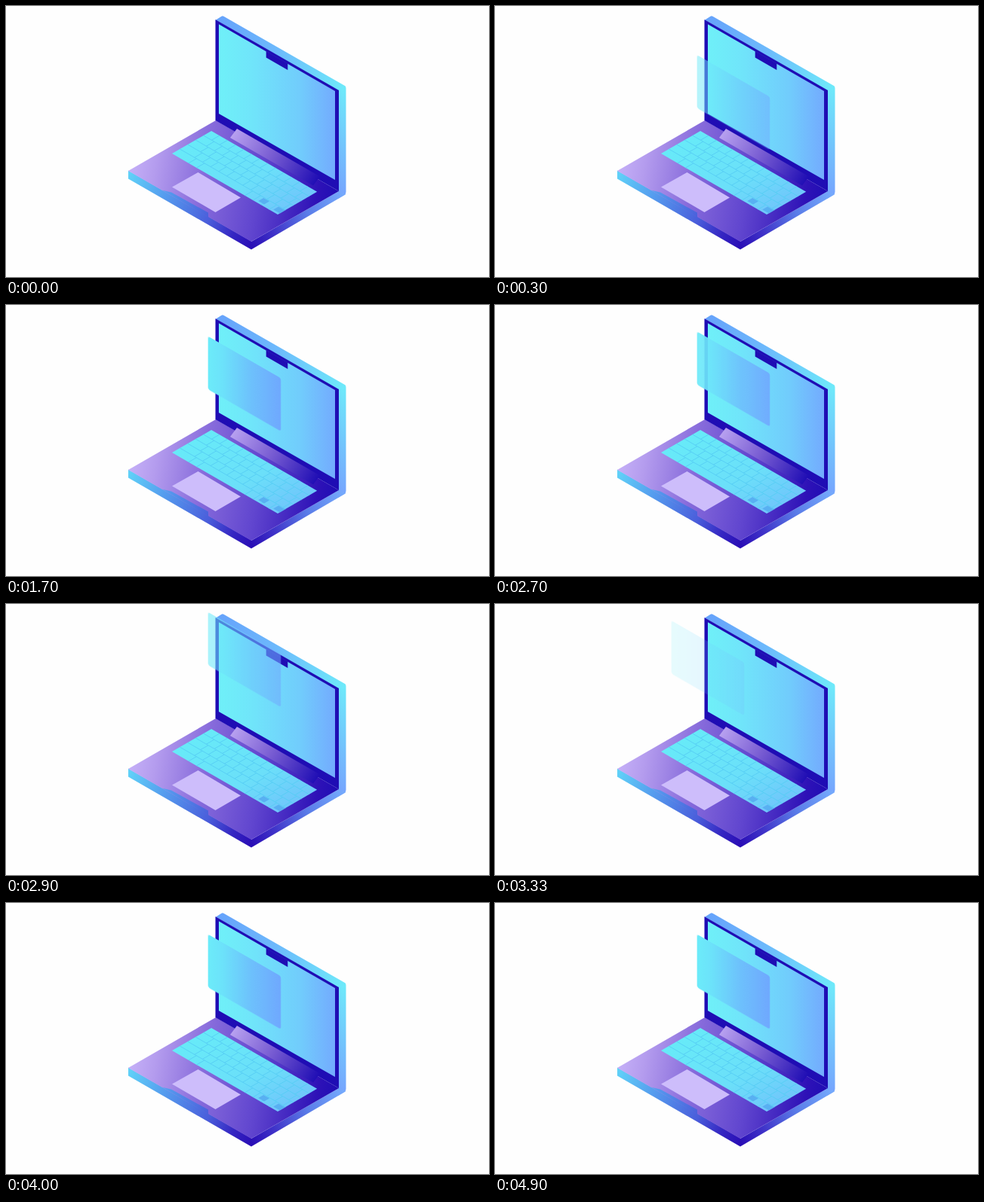
Animation of 640x360 px, one loop 5.9 s. Source, as an HTML page:

```html
<!DOCTYPE html>
<html lang="en">
<head>
<meta charset="utf-8">
<title>Laptop window</title>
<style>
  html, body { margin: 0; width: 100%; height: 100%; overflow: hidden; background: #fefefe; }
  svg { display: block; width: 100vw; height: 100vh; }
</style>
</head>
<body>
<svg viewBox="0 0 640 360">
  <defs>
    <linearGradient id="screen" gradientUnits="userSpaceOnUse" x1="282" x2="436" y1="0" y2="0">
      <stop offset="0" stop-color="#6ff0f8"/><stop offset=".3" stop-color="#70e4fa"/>
      <stop offset=".7" stop-color="#71ccfc"/><stop offset="1" stop-color="#73abfe"/>
    </linearGradient>
    <linearGradient id="window">
      <stop offset="0" stop-color="#6cebf9"/><stop offset=".2" stop-color="#6ce2fa"/>
      <stop offset=".6" stop-color="#6dc0fc"/><stop offset="1" stop-color="#6fa8fe"/>
    </linearGradient>
    <linearGradient id="rim" gradientUnits="userSpaceOnUse" x1="278" y1="16" x2="450" y2="108">
      <stop offset="0" stop-color="#66a2fb"/><stop offset=".45" stop-color="#6cb8fc"/>
      <stop offset="1" stop-color="#6eeafa"/>
    </linearGradient>
    <linearGradient id="edge" gradientUnits="userSpaceOnUse" x1="0" y1="107" x2="0" y2="252">
      <stop offset="0" stop-color="#6eeafa"/><stop offset="1" stop-color="#76a4fe"/>
    </linearGradient>
    <linearGradient id="deck" gradientUnits="userSpaceOnUse" x1="162" y1="205" x2="441" y2="250">
      <stop offset="0" stop-color="#c6b1f8"/><stop offset=".13" stop-color="#b49cee"/>
      <stop offset=".36" stop-color="#876bdb"/><stop offset=".62" stop-color="#6146cf"/>
      <stop offset=".9" stop-color="#2e12b7"/><stop offset="1" stop-color="#1f0db4"/>
    </linearGradient>
    <linearGradient id="front" gradientUnits="userSpaceOnUse" x1="162" y1="224" x2="325" y2="318">
      <stop offset="0" stop-color="#60d2f8"/><stop offset=".3" stop-color="#559bee"/>
      <stop offset=".65" stop-color="#4a5edb"/><stop offset=".85" stop-color="#3526c2"/>
      <stop offset="1" stop-color="#2a0eb6"/>
    </linearGradient>
    <linearGradient id="side" gradientUnits="userSpaceOnUse" x1="325" y1="318" x2="450" y2="250">
      <stop offset="0" stop-color="#2a0eb6"/><stop offset=".25" stop-color="#4034c9"/>
      <stop offset=".6" stop-color="#5a7ce8"/><stop offset="1" stop-color="#76acfd"/>
    </linearGradient>
    <linearGradient id="hinge" gradientUnits="userSpaceOnUse" x1="300" y1="170" x2="412" y2="234">
      <stop offset="0" stop-color="#b8a1f0"/><stop offset=".45" stop-color="#7a5ed3"/>
      <stop offset="1" stop-color="#1f0db4"/>
    </linearGradient>
    <linearGradient id="keys" gradientUnits="userSpaceOnUse" x1="0" y1="0" x2="162" y2="0">
      <stop offset="0" stop-color="#67eaf8"/><stop offset=".6" stop-color="#6bdff9"/>
      <stop offset="1" stop-color="#70c6fb"/>
    </linearGradient>
  </defs>

  <path fill="url(#edge)" d="M440 112L449 106.500Q450.500 107 450.500 109V247Q450.500 250 448 251.300L440 256Z"/>
  <path fill="url(#rim)" d="M278 18.500L285.500 13.700Q287 12.800 288.500 13.700L449 106Q450.500 107 450 108L441 113Z"/>
  <path fill="url(#side)" d="M325 313L441 246L450 250.300L325 323.500Z"/>
  <path fill="url(#front)" d="M162 218.500L325 312.500V323.500L162 229.500Z"/>
  <path fill="url(#deck)" d="M278 152L441 246L325 313L162 219Z"/>
  <path fill="url(#front)" d="M207 244.700L219 247.500L268 274.500V280.500Z"/>
  <path fill="#cdbdfb" d="M254.500 221L311 254.500L277.500 274L220 240.500Z"/>
  <g id="keyboard" transform="matrix(.866 .5 .866 -.5 220 196.100)">
    <rect width="161.700" height="60.200" fill="url(#keys)"/>
    <path id="gaps" fill="none" stroke="#56cdf4" stroke-width=".8"/>
    <path fill="#58b0f2" d="M129 3H138V11H129ZM152 3H162V11H152Z"/>
  </g>
  <path fill="#1f0db4" d="M277.500 18L441 112V246L277.500 152Z"/>
  <path fill="url(#hinge)" d="M306 163L416 226.500L407 238.500L297 175Z"/>
  <path fill="url(#screen)" d="M282 24.300L436 113V231L282 143Z"/>
  <path fill="#1f0db4" d="M344.700 60L373.300 76.500V85L344.700 68.500Z"/>
  <g id="panel" opacity="0">
    <rect width="96.500" height="70.500" rx="3" fill="url(#window)" transform="matrix(1 .577 0 1 267.700 41.500)"/>
  </g>
</svg>
<script>
  const LOOP = 5900, TICKS = 118, STEPS = 12;

  // Key gaps: five rows, each shifted against the next
  const rowH = 60.2 / 5, keyW = 12.3;
  let gaps = '';
  for (let row = 0; row < 5; row++) {
    const y = row * rowH;
    if (row) gaps += `M0 ${y}H161.700`;
    const shift = row === 4 ? 0 : 4 + (3 - row) * 3;
    for (let x = keyW + shift; x < 158; x += keyW) {
      if (row === 0 && x > 42 && x < 100) continue;
      gaps += `M${x} ${y}v${rowH}`;
    }
  }
  document.getElementById('gaps').setAttribute('d', gaps);

  // Linear moves: first tick, start and end offset, start and end opacity
  const moves = [
    { tick: 1, from: [0, 47], to: [0, 0], fade: [0, 1] },
    { tick: 54, from: [0, 0], to: [0, -74], fade: [1, 0] },
    { tick: 66, from: [-40.8, -23.5], to: [0, 0], fade: [0, 1] }
  ];
  const mix = (a, b, p) => a + (b - a) * p;
  const tickTime = k => Math.floor(k / 2) * 100 + (k % 2) * 30;

  function pose(k) {
    const m = moves.filter(m => m.tick <= k).pop();
    if (!m) return { opacity: 0, transform: 'translate(0px, 0px)' };
    const p = Math.min((k - m.tick + 1) / STEPS, 1);
    const [x, y] = m.from.map((v, i) => mix(v, m.to[i], p));
    return { opacity: mix(...m.fade, p), transform: `translate(${x}px, ${y}px)` };
  }

  const frames = [];
  for (let k = 0; k < TICKS; k++)
    frames.push({ ...pose(k), offset: tickTime(k) / LOOP, easing: 'steps(1, end)' });
  frames.push({ ...pose(TICKS - 1), offset: 1 });

  document.getElementById('panel').animate(frames, { duration: LOOP, iterations: Infinity });
</script>
</body>
</html>
```
